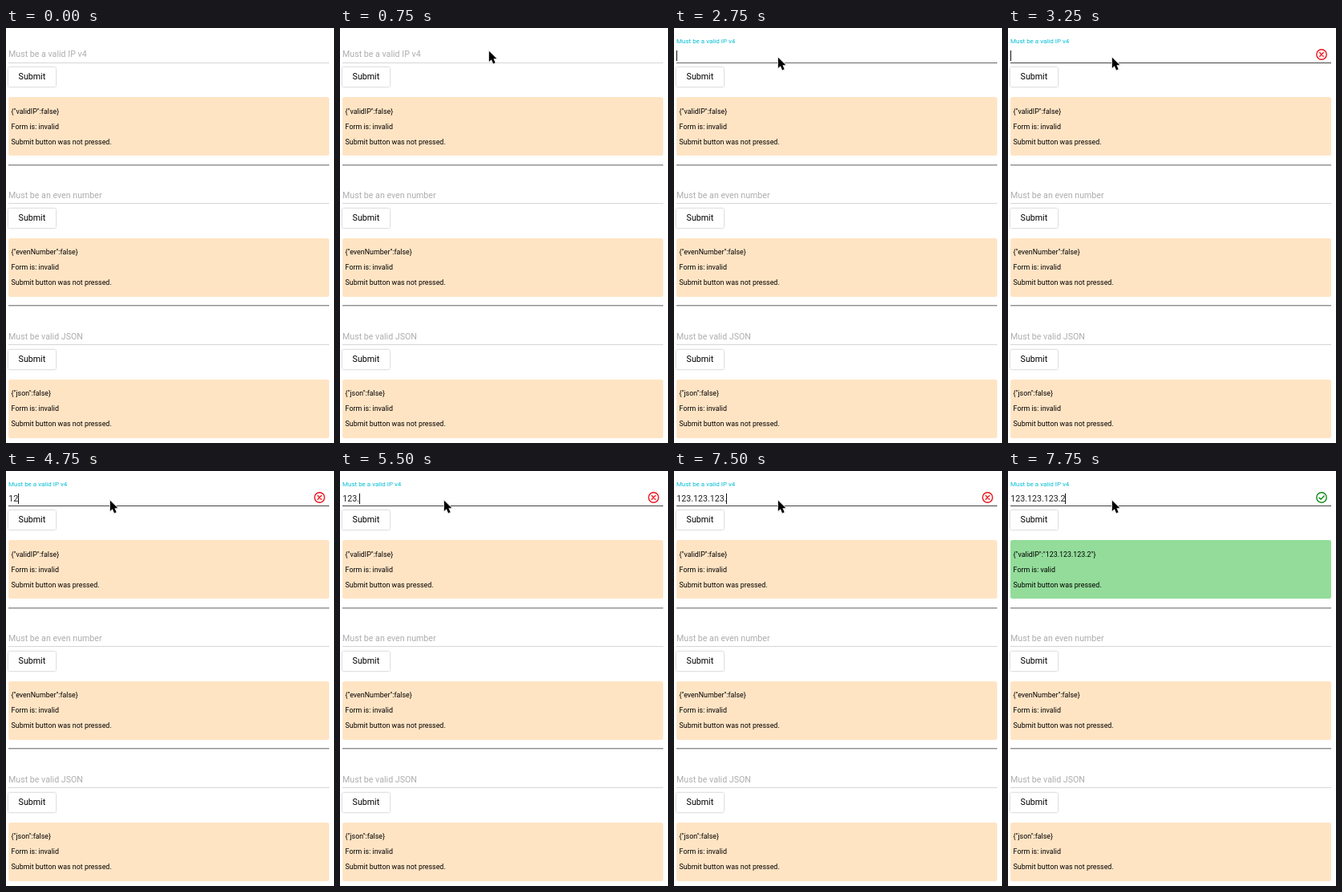
Animation of 409x517 px, one loop 8000 ms. Source, as an HTML page:

```html
<!DOCTYPE html>
<html lang="en">
<head>
<meta charset="utf-8">
<title>Form validation</title>
<style>
  html, body { margin: 0; width: 100%; height: 100%; overflow: hidden; background: #fff; }
  svg { display: block; width: 409px; height: 517px; font-family: Roboto, sans-serif; }
  .field { font-size: 10.67px; fill: #adadad; }
  .button { font-size: 10.67px; fill: #000; }
  .result { font-size: 8.9px; fill: #000; }
  .typed { font-size: 10.67px; fill: #222; }
  .box { filter: drop-shadow(0 .6px .8px rgba(0, 0, 0, .35)); }
  .icon { fill: none; stroke-width: 1.4; stroke-linecap: round; stroke-linejoin: round; }
</style>
</head>
<body>
<svg id="stage" viewBox="0 0 409 517"></svg>
<script>
const LOOP = 8000;
const stage = document.getElementById('stage');

function add(tag, attrs, text = '', parent = stage) {
  const el = document.createElementNS('http://www.w3.org/2000/svg', tag);
  for (const key in attrs) el.setAttribute(key, attrs[key]);
  el.textContent = text;
  parent.append(el);
  return el;
}

const rect = (x, y, width, height, fill, more) =>
  add('rect', { x, y, width, height, fill, ...more });
const label = (cls, x, y, text) => add('text', { class: cls, x, y }, text);

// Holds each value until the next [time, value] row.
function steps(el, property, rows) {
  const frames = rows.map(([time, value]) =>
    ({ offset: time / LOOP, [property]: value, easing: 'step-end' }));
  frames.push({ offset: 1, [property]: rows[rows.length - 1][1] });
  el.animate(frames, { duration: LOOP, iterations: Infinity });
}

const show = (el, from, to = LOOP) => {
  const rows = [[0, from ? 0 : 1]];
  if (from) rows.push([from, 1]);
  if (to < LOOP) rows.push([to, 0]);
  steps(el, 'opacity', rows);
};

function drawForm(top, hint, value, nudge) {
  const form = { hint: label('field', 3, top + 36, hint) };
  rect(3, top + 43 - nudge, 400, 1, '#d6d6d6');
  rect(3, top + 49, 59, 24, '#fff', { rx: 1.5, class: 'box' });
  label('button', 15.6, top + 64, 'Submit');
  form.panel = rect(3, top + 86, 400, 73, '#ffe4c4', { rx: 2.5 });
  form.rows = [value, 'Form is: invalid', 'Submit button was not pressed.']
    .map((text, i) => label('result', 6.6, top + 107 + 19 * i - nudge, text));
  return form;
}

function drawRule(y) {
  rect(3, y, 400, 1, '#8f8f8f');
  rect(3, y + 1, 400, 1, '#d0d0d0');
}

const form = drawForm(0, 'Must be a valid IP v4', '{"validIP":false}', 0);
drawForm(176, 'Must be an even number', '{"evenNumber":false}', 1);
drawForm(352, 'Must be valid JSON', '{"json":false}', 1);
drawRule(170);
drawRule(345);

// Floating label and focus underline
form.hint.removeAttribute('x');
form.hint.removeAttribute('y');
const place = (y, scale) => `translate(3px, ${y}px) scale(${scale})`;
steps(form.hint, 'transform', [
  [0, place(36, 1)], [1750, place(21, .775)], [2000, place(19.2, .752)], [2250, place(19, .75)]
]);
steps(form.hint, 'fill', [[0, '#adadad'], [1750, '#00bcd4']]);

const underline = rect(3, 43, 400, 1, '#777');
underline.style.transformOrigin = '203px 43.5px';
steps(underline, 'transform', [[0, 'scaleX(0)'], [1750, 'scaleX(.9)'], [2000, 'scaleX(1)']]);
steps(underline, 'fill', [[0, '#777'], [2000, '#666'], [3000, '#555'], [3250, '#444']]);

// Validation result
const PRESSED = 3000, VALID = 7750;
steps(form.panel, 'fill', [[0, '#ffe4c4'], [VALID, '#93dc9a']]);
[
  ['{"validIP":"123.123.123.2"}', VALID],
  ['Form is: valid', VALID],
  ['Submit button was pressed.', PRESSED]
].forEach(([text, time], i) => {
  show(form.rows[i], 0, time);
  show(label('result', 6.6, 107 + 19 * i, text), time);
});

function drawIcon(color, mark) {
  const icon = add('g', { class: 'icon', stroke: color, transform: 'translate(391 33)' });
  add('circle', { r: 6.2 }, '', icon);
  add('path', { d: mark }, '', icon);
  return icon;
}
show(drawIcon('#e8141c', 'M-2.2 -2.2L2.2 2.2M2.2 -2.2L-2.2 2.2'), PRESSED, VALID);
show(drawIcon('#108a18', 'M-3 .2L-.9 2.3L3.2 -2'), VALID);

// Typing: time, new characters, caret position
const typing = [
  [4750, '12', 15], [5250, '3', 21], [5500, '.', 24], [6000, '12', 36], [6500, '3.', 44],
  [7000, '12', 56], [7250, '3', 62], [7500, '.', 65], [7750, '2', 71]
];
const typed = typing.map(([time, chars], i) => {
  const before = typing.slice(0, i).map(row => row[1]).join('');
  return [time, before + chars];
});
typed.forEach(([time, text], i) => {
  const next = typed[i + 1];
  show(label('typed', 3.2, 38, text), time, next ? next[0] : LOOP);
});

const caret = rect(3, 28, 1, 13, '#111');
steps(caret, 'transform', [[0, 'translateX(0px)'],
  ...typing.map(([time, , x]) => [time, `translateX(${x - 3}px)`])]);
steps(caret, 'opacity', [0, 1750, 2250, 2750, 3500, 4000, 4500, 4750].map((t, i) => [t, i % 2]));

// Mouse pointer
const pointer = add('path', {
  d: 'M.8 .8V14L3.8 11.2L6.1 16.4L8.6 15.3L6.4 10.3H10.4Z',
  stroke: '#fff', 'stroke-width': 1.6, 'paint-order': 'stroke'
});
pointer.style.filter = 'drop-shadow(0 .5px .6px rgba(0, 0, 0, .35))';
const at = (x, y) => `translate(${x}px, ${y}px)`;
steps(pointer, 'transform', [
  [0, at(185, 30)], [750, at(185, 28)], [1500, at(135, 36)], [1750, at(129, 36)]
]);
show(pointer, 500);
</script>
</body>
</html>
```
